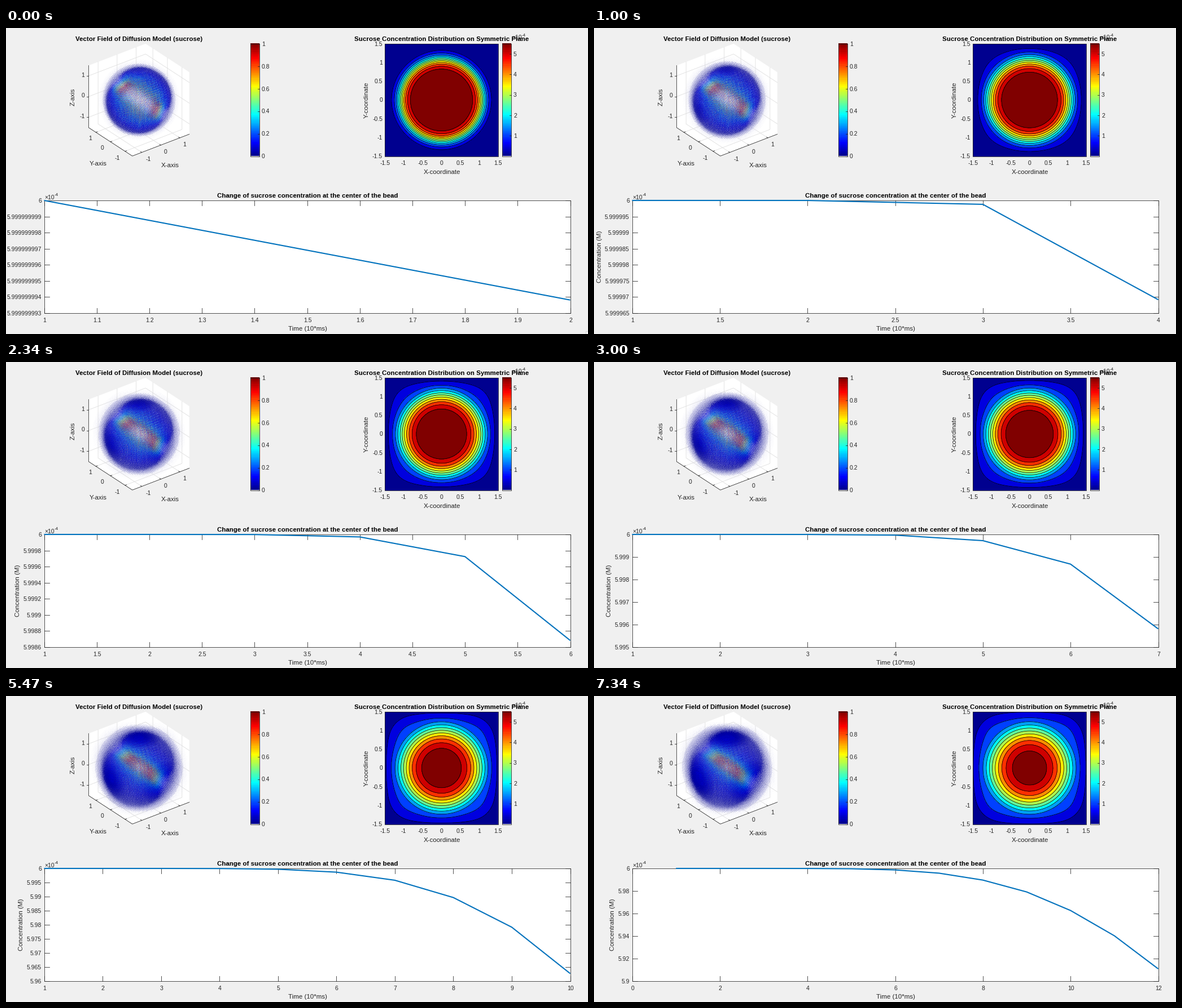
A matplotlib script for the animation above (8 s loop, 1031 px wide and 543 px high).

```python
import math
from itertools import product

import matplotlib.pyplot as plt
import numpy as np
from matplotlib.animation import FuncAnimation

W, H, DPI = 1031, 543, 64
FRAMES, LOOP = 120, 8000
PT = 72 / DPI                                  # points per pixel
INK = (0.15, 0.15, 0.15)
TICK, LABEL = 10.4, 11.45                      # text sizes in pixels

# first frame of every time step, beginning with step 2
STARTS = [0, 5, 15, 25, 35, 45, 56, 67, 82, 96, 110]
STEPS = range(2, 2 + len(STARTS))
# loss of concentration at the centre, steps 1 to 12
DROP = [0, 6.2e-9, 1.21e-6, 3.09e-5, 2.76e-4, 1.32e-3,
        4.2e-3, 0.01035, 0.0209, 0.0374, 0.0599, 0.0893]

k = np.arange(1, 65)[:, None] / 16
JET = np.clip(1.5 - np.abs(k - [3, 2, 1]), 0, 1)

plt.rcParams["font.family"] = "Liberation Sans"
fig = plt.figure(figsize=(W / DPI, H / DPI), dpi=DPI, facecolor="#f0f0f0")
ax = fig.add_axes([0, 0, 1, 1])
ax.axis("off")


def jet(v):
    return JET[np.clip(np.asarray(v) * 64, 0, 63).astype(int)]


def text(x, y, s, size=TICK, ha="center", **kw):
    kw.setdefault("color", INK)
    return ax.text(x, y + 0.36 * size, s, fontsize=size * PT, ha=ha,
                   va="baseline", zorder=8, **kw)


def upright(x, y, s):
    return ax.text(x, y, s, fontsize=LABEL * PT, color=INK, rotation=90,
                   ha="center", va="center", zorder=8)


def line(xs, ys, color=INK, lw=0.8, z=4):
    return ax.plot(xs, ys, color=color, lw=lw * PT, zorder=z)[0]


def title(x, y, s):
    text(x, y, s, LABEL, color="black", weight="bold")


def power(x, y):
    text(x, y, "×10", ha="left")
    text(x + 18, y - 4.5, "-4", 8, ha="left")


# ---- diffusion model ----

RADIUS = 1.105


def conc(x, y, z, n, square=0.0):
    """Concentration (1e-4 M) of a spreading ball; square flattens its rim."""
    w = math.sqrt(0.0275 + 0.0178 * n)
    r = np.linspace(0.001, 3, 500)
    a, b = (RADIUS - r) / w, (RADIUS + r) / w
    erf = np.vectorize(math.erf)
    prof = 3 * (erf(a) + erf(b)) - 3 * w / (r * math.sqrt(math.pi)) * (
        np.exp(-a * a) - np.exp(-b * b))
    rad = np.sqrt(x * x + y * y + z * z)
    m = np.clip((rad - 1.2) / 0.55, 0, 1)
    p = 2 + square * m * m * (3 - 2 * m)
    rho = (np.abs(x) ** p + np.abs(y) ** p + np.abs(z) ** p) ** (1 / p)
    return np.interp(rho, r, prof)


# ---- 3D panel ----

CX, CY, SCALE = 235.5, 127.5, 42.4
AZ, EL = math.radians(-37.5), math.radians(30)
RIGHT = np.array([math.cos(AZ), math.sin(AZ), 0])
UP = np.array([-math.sin(EL) * math.sin(AZ), math.sin(EL) * math.cos(AZ),
               math.cos(EL)])
VIEW = np.array([math.cos(EL) * math.sin(AZ), -math.cos(EL) * math.cos(AZ),
                 math.sin(EL)])
BX, BY, BW, BH, SS = 136, 20, 200, 216, 3      # raster box, supersampling
GRID = 41


def project(p):
    p = np.asarray(p, float)
    return CX + SCALE * (p @ RIGHT), CY - SCALE * (p @ UP)


def edge(*pts, **kw):
    line(*project(pts), **kw)


def field_image(n):
    """Arrows of the outward flux, painted far to near."""
    g = np.linspace(-1.5, 1.5, GRID)
    grid = np.meshgrid(g, g, g, indexing="ij")
    c = conc(*grid, n)
    flux = -np.stack(np.gradient(c, g[1] - g[0]), -1).reshape(-1, 3)
    pos = np.stack(grid, -1).reshape(-1, 3)
    mag = np.linalg.norm(flux, axis=1)
    flux, mag = flux / mag.max(), mag / mag.max()

    depth = pos @ VIEW
    order = np.argsort(depth, kind="stable")
    order = order[(mag[order] > 0.003) & (depth[order] > -0.3)]
    pos, flux, mag = pos[order], flux[order], mag[order]
    fade = np.clip(1.6 * np.sqrt(mag), 0, 1)[:, None]
    color = jet((c.ravel()[order] / 6) ** 1.5) * fade + 1 - fade

    t = np.linspace(0, 0.1, 8)[:, None]
    sx, sy = project(pos[:, None] + t * flux[:, None])
    pen = np.array(list(product((0, 1), repeat=2)))
    pen = pen * (mag > 0.05)[:, None, None, None]     # finer for weak arrows
    ix = ((sx - BX) * SS).astype(int)[..., None] + pen[..., 0]
    iy = ((sy - BY) * SS).astype(int)[..., None] + pen[..., 1]
    cell = np.clip(iy, 0, BH * SS - 1) * BW * SS + np.clip(ix, 0, BW * SS - 1)

    owner = np.full(BW * BH * SS * SS, -1)
    owner[cell.ravel()] = np.repeat(np.arange(len(pos)), cell[0].size)
    rgba = np.zeros((owner.size, 4))
    hit = owner >= 0
    rgba[hit, :3] = color[owner[hit]]
    rgba[hit, 3] = 1
    rgba = rgba.reshape(BH, SS, BW, SS, 4).mean(axis=(1, 3))
    rgba[..., :3] /= np.maximum(rgba[..., 3:], 1e-6)
    return np.clip(rgba, 0, 1)


def cube():
    b = 1.5
    hexagon = [(-b, -b, -b), (b, -b, -b), (b, -b, b),
               (b, b, b), (-b, b, b), (-b, b, -b)]
    ax.fill(*project(hexagon), color="white", lw=0, zorder=1)
    for v in (-1, 0, 1):
        for path in ([(v, -b, -b), (v, b, -b), (v, b, b)],
                     [(-b, v, -b), (b, v, -b), (b, v, b)],
                     [(-b, b, v), (b, b, v), (b, -b, v)]):
            edge(*path, color="#dedede", z=2)
        edge((v, -b, -b), (v, -b + 0.08, -b))
        edge((-b, v, -b), (-b + 0.08, v, -b))
        zx, zy = project((-b, b, v))
        line([zx - 3, zx], [zy, zy])
        text(139.5, 119.7 - 36.6 * v, str(v), ha="right")
    edge((-b, b, b), (-b, b, -b), (-b, -b, -b), (b, -b, -b))
    for x, y, s in ((149, 195, "1"), (171, 212, "0"), (197, 230, "-1"),
                    (252, 232, "-1"), (283, 219, "0"), (316, 206, "1")):
        text(x, y, s)
    text(163.5, 239.5, "Y-axis", LABEL)
    text(290.5, 242.5, "X-axis", LABEL)
    upright(119, 122, "Z-axis")


# ---- fixed parts ----

TOP, BOTTOM = 28, 227.5


def box(x0, x1, y0, y1, **kw):
    line([x0, x1, x1, x0, x0], [y0, y0, y1, y1, y0], **kw)


def colorbar(x0, x1, values, vmax, gap):
    ax.imshow(JET[::-1][:, None], extent=(x0, x1, BOTTOM, TOP),
              aspect="auto", interpolation="nearest", zorder=1)
    box(x0, x1, TOP, BOTTOM)
    for v in values:
        y = BOTTOM - (BOTTOM - TOP) * v / vmax
        line([x1 - 2.5, x1], [y, y])
        text(x1 + gap, y, f"{v:g}", ha="left")


PX, PY = 771.5, (TOP + BOTTOM) / 2             # contour panel
UX, UY = 66.8, (BOTTOM - TOP) / 3
AX0, AX1, AY0, AY1 = 67.5, 999.5, 306, 505.5   # time plot

cube()
title(235.5, 18.7, "Vector Field of Diffusion Model (sucrose)")
colorbar(432.5, 448.5, [0, 0.2, 0.4, 0.6, 0.8, 1], 1, 4.5)

power(896, 16.5)
title(772, 18.7, "Sucrose Concentration Distribution on Symmetric Plane")
colorbar(878.5, 894.5, [1, 2, 3, 4, 5], 5.5, 4.5)
for i in range(-3, 4):
    v = i / 2
    text(PX + UX * v, 239.7, f"{v:g}")
    text(667, PY - UY * v, f"{v:g}", ha="right")
text(772, 254.5, "X-coordinate", LABEL)
upright(639, 128, "Y-coordinate")
box(PX - 1.5 * UX, PX + 1.5 * UX, TOP, BOTTOM)

ax.fill([AX0, AX1, AX1, AX0], [AY0, AY0, AY1, AY1], color="white", lw=0,
        zorder=1)
box(AX0, AX1, AY0, AY1)
title(534, 297, "Change of sucrose concentration at the center of the bead")
text(534, 533, "Time (10*ms)", LABEL)
power(68, 300)

corner = ax.fill([1026.5, 1032, 1032, 1026.5], [537.5, 537.5, 544, 544],
                 facecolor="#fafafa", edgecolor="#cfcfcf", lw=0.8 * PT,
                 zorder=2)[0]


# ---- parts of each time step ----

LEVELS = np.arange(0.5, 5.6, 0.5)
BANDS = [tuple(c) for c in jet(np.arange(12) / 11)]


def contours(n):
    g = np.linspace(-1.5, 1.5, 91)
    x, y = np.meshgrid(g, g)
    c = conc(x, y, 0 * x, n, square=1.6 * (1 - math.exp(1 - n / 2)))
    px, py = PX + UX * x, PY + UY * y
    return [ax.contourf(px, py, c, levels=[-1, *LEVELS, 9], colors=BANDS,
                        zorder=2),
            ax.contour(px, py, c, levels=LEVELS, colors="black",
                       linewidths=0.75 * PT, zorder=3)]


def y_step(drop):
    """Largest 1-2-5 step that gives at least five intervals."""
    e = math.floor(math.log10(drop))
    steps = [m * 10.0 ** d for d in (e, e - 1) for m in (5, 2, 1)]
    return next(s for s in steps if math.ceil(drop / s) >= 5)


def time_plot(n):
    parts = []
    drop = DROP[n - 1]
    dy = y_step(drop)
    rows = math.ceil(drop / dy)
    digits = -math.floor(math.log10(dy * 1.0001))
    longest = 0
    for i in range(rows + 1):
        y = AY0 + (AY1 - AY0) * i / rows
        s = f"{6 - i * dy:.{digits}f}".rstrip("0").rstrip(".")
        longest = max(longest, len(s))
        parts += [text(62.8, y + 0.5, s, ha="right"),
                  line([AX0, AX0 + 9], [y, y]), line([AX1 - 9, AX1], [y, y])]
    wide = TICK * (0.556 * (longest - 1) + 0.278)
    parts.append(upright(52.9 - wide, 406, "Concentration (M)"))

    dx = next(s for s in (0.1, 0.2, 0.5, 1, 2) if (n - 1) / s <= 10.01)
    lo, hi = (0, n) if dx == 2 else (1, n)
    cols = round((hi - lo) / dx)
    for i in range(cols + 1):
        x = AX0 + (AX1 - AX0) * i / cols
        parts += [text(x + 0.5, 518, f"{lo + i * dx:g}"),
                  line([x, x], [AY0, AY0 + 9]), line([x, x], [AY1 - 9, AY1])]

    ts = np.arange(1, n + 1)
    xs = AX0 + (AX1 - AX0) * (ts - lo) / (hi - lo)
    ys = AY0 + (AY1 - AY0) * np.array(DROP[:n]) / (rows * dy)
    curve = line(xs, ys, color="#0072bd", lw=2.1, z=6)
    curve.set_solid_capstyle("butt")
    return parts + [curve]


def build(n):
    field = ax.imshow(field_image(n), extent=(BX, BX + BW, BY + BH, BY),
                      aspect="auto", interpolation="nearest", zorder=3)
    return [field, *contours(n), *time_plot(n)]


states = [build(n) for n in STEPS]
ax.set_xlim(0, W)
ax.set_ylim(H, 0)


def draw(i):
    now = sum(i >= s for s in STARTS) - 1
    for j, parts in enumerate(states):
        for part in parts:
            part.set_visible(j == now)
    corner.set_visible(i == 0)
    return []


anim = FuncAnimation(fig, draw, frames=FRAMES, interval=LOOP / FRAMES,
                     repeat=True, repeat_delay=0, blit=False)
plt.show()
```
